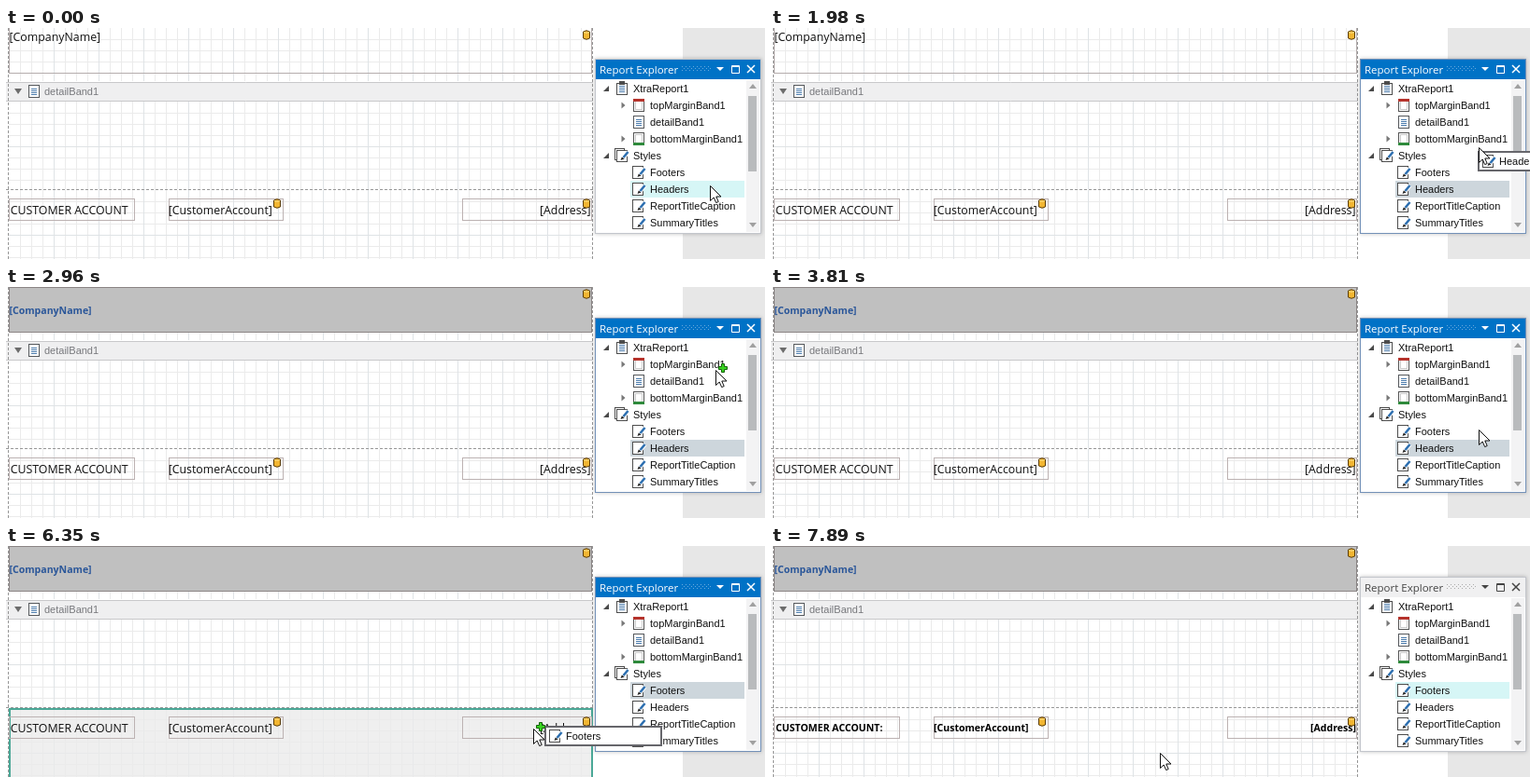
An HTML page that plays this animation: 812 by 248 pixels, repeating every 8 s.

```html
<!DOCTYPE html>
<html lang="en">
<head>
<meta charset="utf-8">
<title>Report designer</title>
<style>
html, body { margin: 0; width: 100%; height: 100%; overflow: hidden; background: #fff; }
svg { display: block; }
text { white-space: pre; }
.ui { font: 11px "Liberation Sans", Arial, sans-serif; fill: #111; }
.field { font: 12.35px "Open Sans", "Noto Sans", sans-serif; fill: #111; }
.bold { font: bold 10.55px "Open Sans", "Noto Sans", sans-serif; fill: #000; }
.title { font: 11.5px "Open Sans", "Noto Sans", sans-serif; }
.blue { fill: #2a5699; }
</style>
</head>
<body>
<svg id="stage" width="812" height="248" viewBox="0 0 812 248"></svg>
<script>
const LOOP = 8000;
const GRID = 12;

const rect = (x, y, w, h, fill, more = '') =>
  `<rect x="${x}" y="${y}" width="${w}" height="${h}" fill="${fill}" ${more}/>`;
const box = (x, y, w, h, line, fill = 'none') =>
  rect(x + .5, y + .5, w - 1, h - 1, fill, `stroke="${line}"`);
const path = (d, fill = 'none', line = 'none', w = 1) =>
  `<path d="${d}" fill="${fill}" stroke="${line}" stroke-width="${w}"/>`;
const text = (x, y, cls, s, more = '') => `<text x="${x}" y="${y}" class="${cls}" ${more}>${s}</text>`;
const group = (id, inner) => `<g id="${id}">${inner}</g>`;
const at = (x, y, inner) => `<g transform="translate(${x} ${y})">${inner}</g>`;
const dash = d => `<path d="${d}" fill="none" stroke="#979797" stroke-dasharray="3 2"/>`;

// Icons are centred on 0,0
const pencil =
  path('M6.5-4L1.5 2', 'none', '#fff', 4.5) +
  path('M6.5-4L1.5 2', 'none', '#2d6fb0', 2.6) + path('M-1.5 5L-.2 1.4L2.6 3.6Z', '#222');
const styleIcon = box(-7, -7, 12, 14, '#4d4d4d', '#fff') + pencil;
const stylesIcon = box(-8, -8, 11, 13, '#4d4d4d', '#fff') + box(-6, -6, 12, 13, '#4d4d4d', '#fff') + pencil;
const lines = [-3, -1, 1, 3].map(y => rect(-3, y, 6, 1, '#4a7bad')).join('');
const docIcon = box(-6, -7, 12, 14, '#55585c', '#fff') + lines;
const reportIcon = box(-6, -6, 12, 13, '#4d4d4d', '#fff') + rect(-3, -8, 6, 4, '#4d4d4d') + lines;
const marginIcon = (y, c) =>
  box(-6, -7, 12, 14, '#555', '#fff') + box(-4, -5, 8, 10, '#c9c9c9') + rect(-6, y, 12, 3, c);
const dbIcon =
  path('M-3.5-3.5Q0-6 3.5-3.5V3.5Q0 6 -3.5 3.5Z', '#f2b632', '#5b3d08') +
  path('M-3-3Q0-1.5 3-3', 'none', '#ffe08a');
const opened = path('M-3 3H3V-3Z', '#4a4a4a');
const closed = path('M-1.5-3.5L2.5 0L-1.5 3.5Z', '#777');

// Rows of the tree: label, depth, icon, expander
const rows = [
  ['XtraReport1', 0, reportIcon, opened],
  ['topMarginBand1', 1, marginIcon(-7, '#b5322b'), closed],
  ['detailBand1', 1, docIcon, ''],
  ['bottomMarginBand1', 1, marginIcon(4, '#2f8a3c'), closed],
  ['Styles', 0, stylesIcon, opened],
  ['Footers', 1, styleIcon, ''],
  ['Headers', 1, styleIcon, ''],
  ['ReportTitleCaption', 1, styleIcon, ''],
  ['SummaryTitles', 1, styleIcon, '']
];
const rowY = i => 65 + 18 * i;
const tree = rows.map(([name, depth, icon, arrow], i) => {
  const x = 659 + 18 * depth;
  return at(x - 17, rowY(i), arrow) + at(x, rowY(i), icon) + text(x + 12, rowY(i) + 4, 'ui', name);
}).join('');

// Design surface bands: top, bottom edge
const bands = [[-4, 57], [79, 173], [174, 252]];

function gridLines(top, bottom) {
  const start = Math.max(top, 0);
  let fine = '', coarse = '';
  const add = (i, d) => { if (i % 4) fine += d; else coarse += d; };
  for (let i = 1; 3 + i * GRID < 627; i++) add(i, `M${3.5 + i * GRID} ${start}V${bottom}`);
  for (let i = 1; start + i * GRID < bottom; i++) add(i, `M3 ${start + i * GRID + .5}H627`);
  return path(fine, 'none', '#ebebeb') + path(coarse, 'none', '#dfe3e6');
}

const lit = bands.map(([a, b], i) => group('band' + i,
  rect(3, a, 625, b - a, '#ebebeb', 'fill-opacity=".8"') +
  rect(4, a + 1, 623, b - a - 2, 'none', 'stroke="#4ba897" stroke-width="2"'))).join('');

const fields =
  group('plainTop', box(3, -2, 624, 51, '#b5adad') + text(3.5, 13.7, 'field', '[CompanyName]')) +
  group('styledTop', box(3, 0, 624, 49, '#8b8585', '#c0c0c0') + text(3.5, 29, 'bold blue', '[CompanyName]')) +
  box(3, 183, 135, 24, '#bcb2b2') + box(174, 183, 123, 24, '#bcb2b2') + box(488, 183, 139, 24, '#bcb2b2') +
  group('plainFoot', text(4.7, 200, 'field', 'CUSTOMER ACCOUNT') + text(173.7, 200, 'field', '[CustomerAccount]') +
    text(625.5, 200, 'field', '[Address]', 'text-anchor="end"')) +
  group('styledFoot', text(5, 199, 'bold', 'CUSTOMER ACCOUNT:') + text(174, 199, 'bold', '[CustomerAccount]') +
    text(626, 199, 'bold', '[Address]', 'text-anchor="end"')) +
  at(621, 7.5, dbIcon) + at(290, 188.5, dbIcon) + at(621, 188.5, dbIcon);

const header =
  rect(0, 58, 628, 21, '#efeff0') + path('M0 58.5H628M0 78.5H628', 'none', '#c8c8ca') +
  path('M9 65H17L13 71Z', '#6c6c6c') + at(30, 68, docIcon) +
  text(41, 72, 'ui', 'detailBand1', 'style="fill:#77787c"');

const dots = Array.from({ length: 24 }, (_, i) =>
  rect(723 + (i % 8) * 4 + (Math.floor(i / 8) % 2) * 2, 41 + Math.floor(i / 8) * 2, 1, 1, 'currentColor', 'opacity=".4"')).join('');

const panel =
  `<g style="filter:drop-shadow(0 0 2px rgba(0,0,0,.25))"><rect id="frame" x="630.5" y="33.5" width="177" height="187" fill="#fff"/></g>` +
  rect(631, 34, 176, 21, '#0072c6', 'id="titleBar"') +
  group('caption',
    text(635, 48.5, 'title', 'Report Explorer', 'fill="currentColor"') + dots +
    path('M760 42H768L764 46Z', 'currentColor') +
    path('M776.5 40.5H784.5V48.5H776.5ZM776 41.5H785', 'none', 'currentColor') +
    path('M793 40L801 48M801 40L793 48', 'none', 'currentColor', 1.5)) +
  rect(792, 56, 14, 163, '#f3f3f4') + rect(794, 73, 9, 81, '#b9bbbd') +
  path('M795 65H803L799 60Z', '#a0a0a0') + path('M795 209H803L799 214Z', '#a0a0a0') +
  rect(668, 0, 122, 18, '#cdd6dc', 'id="chosen"') +
  `<rect id="target" x="668.5" width="121" height="17" fill="#d6f5f7" stroke="#58b5dc"/>` +
  tree;

const ghost = group('ghost',
  rect(1, 1, 124, 20, '#fff', 'stroke="#66666b" stroke-width="2"') +
  at(12, 11, styleIcon) + `<text id="label" x="23" y="15" class="ui"></text>`);
const cursor = group('cursor',
  path('M.5 .5V16.5L4.2 13L6.7 18.6L9.2 17.5L6.8 12H12Z', '#fff', '#111') +
  group('plus', path('M6.5-6.5H9.5V-3.5H12.5V-.5H9.5V2.5H6.5V-.5H3.5V-3.5H6.5Z', '#39d321', '#14610b')));

document.getElementById('stage').innerHTML =
  rect(0, 0, 812, 248, '#fff') + rect(724, 0, 88, 248, '#e7e7e7') +
  bands.map(b => gridLines(...b)).join('') + header +
  dash('M2.5 0V248M627.5 0V248M0 173.5H628') +
  lit + fields + panel + ghost + cursor;

// Pointer tip: time, x, y
const track = [
  [0, 753, 169], [1650, 753, 169], [1950, 757, 132], [2250, 760, 97], [2340, 760, 94],
  [2390, 760, 93], [2560, 760, 89], [3160, 759, 89], [3320, 758, 90], [3810, 757, 153],
  [3930, 756, 157], [4090, 756, 157], [4120, 755, 157], [5780, 755, 157], [5810, 753, 156],
  [5910, 753, 157], [6590, 461, 217], [6740, 416, 220], [7760, 416, 220], [7890, 416, 222], [LOOP, 416, 222]
];
function pointer(t) {
  const i = Math.max(1, track.findIndex(k => k[0] >= t));
  const [a, b] = [track[i - 1], track[i]];
  const p = (t - a[0]) / (b[0] - a[0]);
  return [1, 2].map(n => Math.round(a[n] + (b[n] - a[n]) * p));
}

const $ = id => document.getElementById(id);
const show = (id, on) => $(id).setAttribute('visibility', on ? 'visible' : 'hidden');
const set = (id, name, v) => $(id).setAttribute(name, v);
const between = (t, a, b) => t >= a && t < b;

function draw(t) {
  const [x, y] = pointer(t);
  const first = between(t, 1650, 2960), second = between(t, 5910, 7400);
  const overRow = first && y < 128 ? Math.floor((y - 74) / 18) : -1;
  const band = second && x < 629 ? 2 : overRow;
  const top = t >= 2960, foot = t >= 7430, idle = t >= 7460;
  const active = t >= 860 && !idle;

  bands.forEach((_, i) => show('band' + i, i === band));
  show('plainTop', !top);
  show('styledTop', top);
  show('plainFoot', !foot);
  show('styledFoot', foot);

  set('frame', 'stroke', active ? '#7391b8' : '#c3c6cc');
  set('titleBar', 'fill', idle ? '#f0f0f1' : '#0072c6');
  set('caption', 'color', idle ? '#444' : '#fff');
  set('chosen', 'y', rowY(t < 4550 ? 6 : 5) - 9);
  set('chosen', 'fill', active ? '#cdd6dc' : '#d6f6f6');
  show('target', overRow >= 0);
  set('target', 'y', rowY(overRow + 1) - 8.5);

  const [gx, gy] = pointer(Math.max(0, t - 30));
  show('ghost', first || second);
  set('ghost', 'transform', `translate(${gx - 1} ${gy})`);
  $('label').textContent = second ? 'Footers' : 'Headers';
  set('cursor', 'transform', `translate(${x} ${y})`);
  show('plus', band >= 0 || between(t, 2960, 3160) || between(t, 7400, 7760));
}

const begin = performance.now();
function tick() {
  draw((performance.now() - begin) % LOOP);
  requestAnimationFrame(tick);
}
tick();
</script>
</body>
</html>
```
